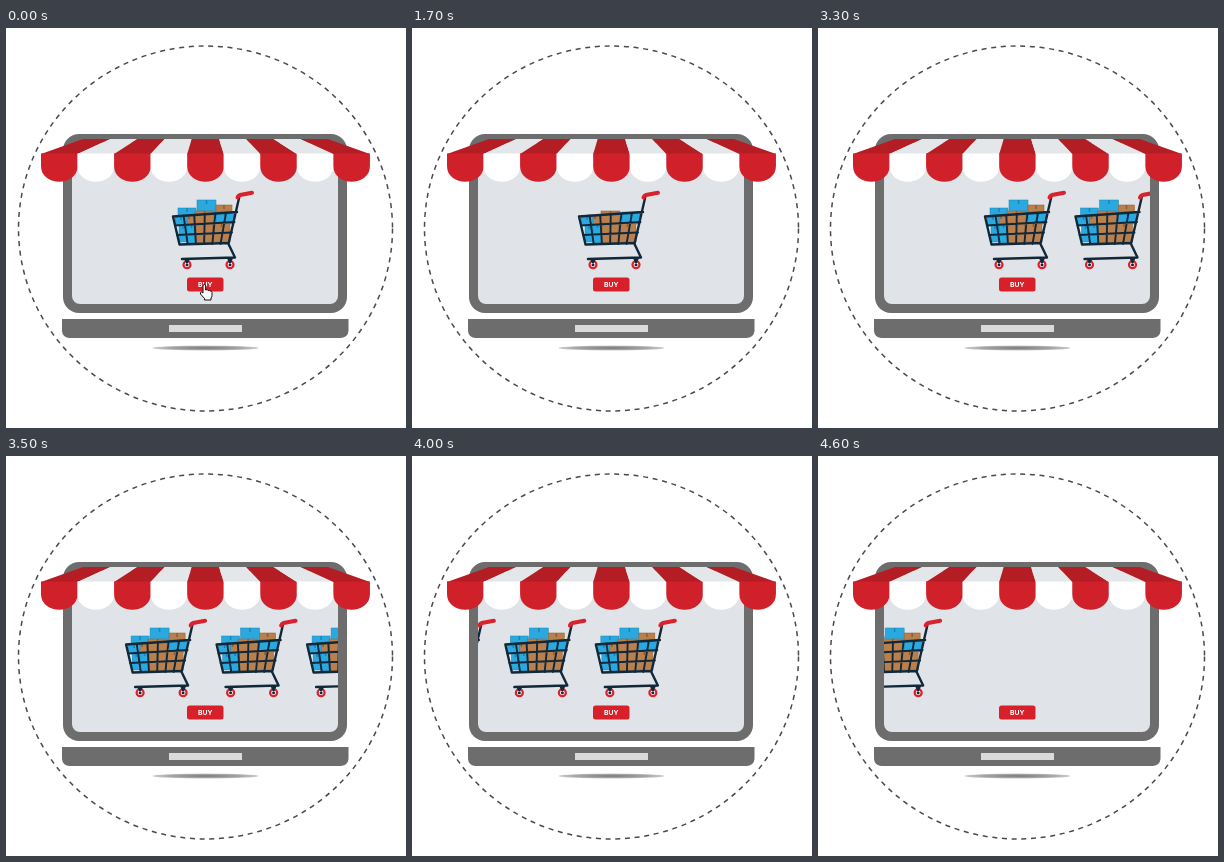
Write an HTML page that moves like this. It is 400 by 400 pixels and loops after 4700 ms.

```html
<!DOCTYPE html>
<html lang="en">
<head>
<meta charset="utf-8">
<title>Online shop</title>
<style>
  html, body { margin: 0; width: 100%; height: 100%; overflow: hidden; background: #fff; }
  svg { display: block; width: 100vw; height: 100vh; }
  .wire { fill: none; stroke: #10283a; stroke-linecap: round; stroke-linejoin: round; }
  text { font: 700 6.8px Inter, "Open Sans", sans-serif; fill: #fff; text-anchor: middle; }
</style>
</head>
<body>
<svg viewBox="0 0 400 400">
  <defs>
    <clipPath id="screen"><rect x="66" y="115" width="266" height="161" rx="8"/></clipPath>
    <radialGradient id="shade">
      <stop offset="0" stop-color="#777"/>
      <stop offset=".7" stop-color="#a5a8aa"/>
      <stop offset="1" stop-color="#ccc"/>
    </radialGradient>
    <g id="cart">
      <path d="M167 188L231 184L224 214L173 216Z" fill="#e9ecef"/>
      <g id="goods"></g>
      <g class="wire">
        <path id="grid" stroke-width="1.900"/>
        <path d="M233.500 168L222.500 216L229 229.500L176 231M231 184L167 188.500L173.500 216.500L222.500 215" stroke-width="2.400"/>
      </g>
      <path d="M231.500 169.500Q232 167.500 234 167L246 164.800" fill="none" stroke="#d8232e" stroke-width="4" stroke-linecap="round"/>
      <g fill="#fff" stroke="#d8232e" stroke-width="2.200">
        <circle cx="181" cy="236.700" r="3.500"/>
        <circle cx="224" cy="236.700" r="3.500"/>
      </g>
      <g fill="#10283a">
        <circle cx="181" cy="236.700" r="1.500"/>
        <circle cx="224" cy="236.700" r="1.500"/>
        <path d="M178 231h6l-2 4h-2zM221 230h6l-2 5h-2z"/>
      </g>
    </g>
  </defs>

  <ellipse cx="199.500" cy="200.500" rx="187" ry="182.500" fill="none" stroke="#4a4a4a" stroke-width="1.500" stroke-dasharray="5 4.700"/>

  <ellipse cx="199.500" cy="320" rx="53" ry="2.500" fill="url(#shade)"/>
  <rect x="57" y="106" width="284" height="179" rx="16" fill="#6d6d6e"/>
  <rect x="66" y="115" width="266" height="161" rx="8" fill="#e0e3e7"/>
  <path d="M56 291H342.500V303Q342 309 335 310H63Q56.500 309 56 303Z" fill="#6d6d6e"/>
  <rect x="163" y="297" width="73" height="7" fill="#d9dadc"/>

  <g clip-path="url(#screen)" id="carts">
    <use href="#cart"/><use href="#cart"/><use href="#cart"/>
  </g>
  <g id="awning"></g>

  <rect x="181" y="249.500" width="36.500" height="14" rx="2.500" fill="#d8202a"/>
  <text x="199.200" y="259">BUY</text>
  <path id="hand" d="M165 265V258Q165 256.500 166.300 256.500T167.600 258V262Q169.500 261 170.200 262.500Q171.800 261.800 172.300 263.200Q174 262.800 174 264.500V267.500Q174 269 173 270V272H166.500V270.500L162.500 266Q162 264 163.500 264Z" fill="#fff" stroke="#111" stroke-width="1" stroke-linejoin="round"/>
</svg>
<script>
const LOOP = 4700, SLIDE = 3300, STEP = 23.45, GAP = 90.5;
const $ = id => document.getElementById(id);
const BLUE = ["#29a9e0", "#1b84b5"], BROWN = ["#b97f4c", "#8d5c33"];

// Parcels, back to front: time of arrival, x, y, width, height, colours
const parcels = [
  [2300, 191, 172, 19, 16, BLUE],
  [2100, 210, 177, 16, 16, BROWN],
  [1900, 172, 180, 18, 10, BLUE],
  [1700, 176, 187, 14, 10, BROWN],
  [1500, 189, 183, 19, 13, BROWN],
  [1300, 210, 184, 18, 12, BLUE],
  [1100, 169, 188, 12, 9, BLUE],
  [900, 173, 197, 8, 17, BLUE],
  [700, 181, 196, 9, 19, BLUE],
  [500, 190, 195, 17, 20, BROWN],
  [500, 207, 195, 17, 19, BROWN]
];
$("goods").innerHTML = parcels.map(([, x, y, w, h, [fill, tape]]) =>
  `<g><rect x="${x}" y="${y}" width="${w}" height="${h}" fill="${fill}" stroke="${tape}" stroke-width=".5"/>
   <path d="M${x + w / 2} ${y}v4" stroke="${tape}" stroke-width="1.5"/></g>`).join("");
const goods = [...$("goods").children];

// Basket wires: uprights lean inwards, rails follow the tapering sides
let wires = "M169 197.500L228.500 194M171 207L226 204.500";
for (let i = 1; i < 6; i++)
  wires += `M${167 + i * 10.6} ${188.5 - i * .7}L${173.5 + i * 8.2} 216`;
$("grid").setAttribute("d", wires);

// Awning: slanted roof strip above a row of scallops
let awning = "";
for (let i = 0; i < 9; i++) {
  const x = 35 + i * 36.55, r = x + 36.55, top = 77 + i * 27.2;
  const [roof, flap] = i % 2 ? ["#e4e7ea", "#fff"] : ["#b41d23", "#d0202a"];
  awning += `<path d="M${x} 126L${top} 111H${top + 27.2}L${r} 126Z" fill="${roof}"/>
    <path d="M${x} 125.500H${r}V138C${r} 159 ${x} 159 ${x} 138Z" fill="${flap}"/>`;
}
$("awning").innerHTML = awning;

const show = (el, on) => el.setAttribute("visibility", on ? "inherit" : "hidden");
const move = (el, x) => el.setAttribute("transform", `translate(${x} 0)`);

function draw(now) {
  const t = Math.floor(now % LOOP / 100) * 100;
  const opening = t < 100, sliding = t >= SLIDE;

  parcels.forEach((p, i) => show(goods[i], opening || t >= p[0]));

  const shift = sliding ? (t - SLIDE) / 100 * STEP : 0;
  [...$("carts").children].forEach((cart, i) => {
    show(cart, !i || sliding);
    move(cart, i * GAP - shift);
  });

  show($("hand"), opening || t >= 2500 && !sliding);
  move($("hand"), opening ? 32 : Math.min(Math.max((t - 2500) / 400, 0), 1) * 32);
}

const start = performance.now();
function tick() {
  draw(performance.now() - start);
  requestAnimationFrame(tick);
}
tick();
</script>
</body>
</html>
```
